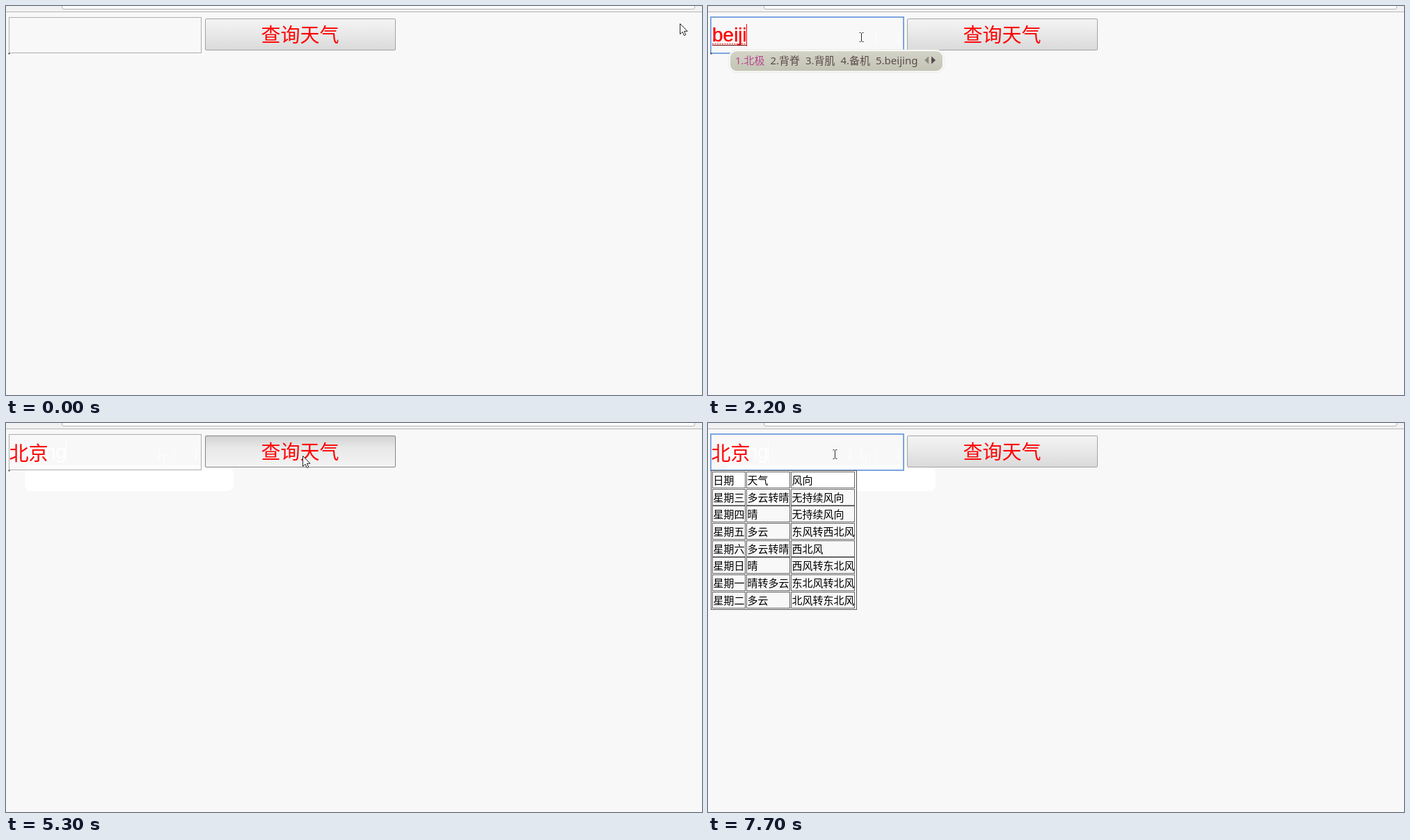
An HTML page that plays this animation: 1000x560 px, repeating every 8000 ms.

```html
<!DOCTYPE html>
<html lang="zh-CN">
<head>
<meta charset="utf-8">
<title>查询天气</title>
<style>
  html, body { margin: 0; width: 100%; height: 100%; overflow: hidden; background: #f8f8f8; }
  svg { display: block; width: 100vw; height: 100vh; }
  text { font-family: "Noto Sans CJK SC", "Noto Sans CJK", sans-serif; white-space: pre; }
  .big { font-size: 28px; font-weight: 350; fill: #f00; }
  .latin { font-family: "Liberation Sans", Arial, sans-serif; font-weight: 400; }
  #latin { stroke: #f00; stroke-width: .4; }
  .cell { font-size: 15px; fill: #000; stroke: none; }
  .option { font: 15px "Noto Sans", "Noto Sans CJK SC", "Noto Sans CJK", sans-serif; fill: #5b494b; }
  .option:first-child { fill: #b9458b; }
  .trace { fill: none; stroke: #fff; }
  #table rect, #field { shape-rendering: crispEdges; }
</style>
</head>
<body>
<svg id="stage" viewBox="0 0 1000 560">
  <defs>
    <linearGradient id="normal" x2="0" y2="1">
      <stop stop-color="#f4f4f4"/><stop offset=".38" stop-color="#ebebeb"/><stop offset="1" stop-color="#dadada"/>
    </linearGradient>
    <linearGradient id="hover" x2="0" y2="1">
      <stop stop-color="#f4f4f4"/><stop offset=".38" stop-color="#ececec"/><stop offset="1" stop-color="#dadada"/>
    </linearGradient>
    <linearGradient id="pressed" x2="0" y2="1">
      <stop stop-color="#d2d2d2"/><stop offset=".4" stop-color="#e9e9e9"/><stop offset="1" stop-color="#f3f3f3"/>
    </linearGradient>
    <linearGradient id="bar" x2="0" y2="1">
      <stop stop-color="#d3d4c8"/><stop offset="1" stop-color="#c3c4b4"/>
    </linearGradient>
    <path id="beam" d="M-2.5 -6.5H-.5M1.5 -6.5H3.5M.5 -6V6M-2.5 6.5H-.5M1.5 6.5H3.5"/>
  </defs>

  <rect width="1000" height="560" fill="#f8f8f8"/>
  <rect width="1000" height="8" fill="#f1f1f1"/>
  <path d="M80.5 -1V2Q80.5 4.5 83 4.5H987Q989.5 4.5 989.5 2V-1" fill="#fff" stroke="#b4b4b4"/>
  <path d="M0 8.5H1000" stroke="#b6b6b6"/>

  <g id="residue">
    <path d="M27 61H281V68H27Z" fill="#fff" opacity=".7"/>
    <path d="M27 68H281V64H317Q327 64 327 74V88Q327 98 317 98H37Q27 98 27 88Z" fill="#fff"/>
    <text class="big latin" x="55.8" y="51" style="fill:#fff">ng</text>
    <path class="trace" d="M86.5 27V58"/>
  </g>
  <g id="traces"></g>

  <rect id="field" fill="none"/>
  <rect id="dot" x="3.5" y="67.5" width="2" height="2" fill="#444"/>
  <rect id="button" x="286.5" y="18.5" width="273" height="45" rx="1.5"/>
  <text class="big" x="366.5" y="51.7">查询天气</text>

  <text id="latin" class="big latin" x="6" y="51"></text>
  <g id="underline" fill="none">
    <path id="squiggle" stroke="#f00" stroke-dasharray="2 1.5"/>
    <path id="rule" stroke="#6b0000"/>
  </g>
  <text id="city" class="big" x="4.4" y="54">北京</text>
  <path id="caret" stroke="#f00"/>

  <g id="popup">
    <rect id="rim" x="30" y="63" height="32.5" rx="11" fill="#fff" stroke="#e6e6e2"/>
    <rect id="pill" x="32" y="65" height="28.5" rx="9" fill="url(#bar)"/>
    <g id="options"></g>
    <g id="arrows"><path d="M6 -5.5V5.5L0 0Z" fill="#8b8b82"/><path d="M10 -5.5V5.5L16 0Z" fill="#5b494b"/></g>
  </g>

  <g id="table" fill="none" stroke="#555"></g>
  <g id="cursor">
    <path id="arrow" d="M.5 .5V15.5L4 12.2L6.3 17.5L8.7 16.5L6.4 11.3H11Z" fill="#fff" stroke="#222"/>
    <g id="textCursor" fill="none"><use href="#beam" stroke="#fff" stroke-width="3"/><use href="#beam" stroke="#222"/></g>
  </g>
</svg>
<script>
const DURATION = 8000;
const $ = id => document.getElementById(id);
const show = (id, on) => $(id).setAttribute('visibility', on ? 'visible' : 'hidden');
const set = (el, attrs) => { for (const k in attrs) el.setAttribute(k, attrs[k]); };
function add(parent, tag, attrs, text) {
  const el = document.createElementNS('http://www.w3.org/2000/svg', tag);
  set(el, attrs);
  if (text) el.textContent = text;
  return parent.appendChild(el);
}
// Each entry starts with its time; the latest one reached is in force.
const latest = (list, t) => list.reduce((a, b) => b[0] <= t ? b : a);
const within = (t, ...spans) => spans.some(([a, b]) => t >= a && t < b);

const pointer = [
  [0, 968, 25], [100, 934, 28], [200, 830, 33], [300, 660, 38], [400, 440, 42],
  [500, 273, 45], [600, 241, 45], [700, 220, 45], [4600, 226, 53],
  [4800, 290, 56], [4900, 348, 53], [5000, 398, 49], [5100, 420, 48], [5200, 426, 47],
  [6300, 345, 46], [6400, 241, 45], [6500, 204, 45], [6600, 182, 45]
];
const typed = [[0, ''], [1800, 'be'], [1900, 'bei'], [2200, 'beiji'], [2400, 'beijin'], [3400, 'beijing'], [4000, '']];
const choices = [
  [0, ''], [1900, '北 被 背 杯 贝'], [2200, '北极 背脊 背肌 备机 beijing'],
  [2400, '被禁 北金 背筋 贝金 悲今'], [3500, '北京 背景 北境 背静 悲境'], [4000, '']
];
const borders = { normal: '#a3a3a3', hover: '#858585', pressed: '#858585' };
const advance = { b: 15.57, e: 15.57, i: 6.22, j: 6.22, n: 15.57, g: 15.57 };
const textWidth = s => [...s].reduce((w, c) => w + advance[c], 0);
const choiceWidth = s => 12.5 + (/[a-z]/.test(s) ? 45 : 15 * s.length);

const traces = [[600, 273, 45], [700, 241, 45], [4600, 220, 45], [4800, 226, 53], [6600, 204, 45]]
  .map(([time, x, y]) => ({ time, el: add($('traces'), 'use', { href: '#beam', class: 'trace', transform: `translate(${x} ${y})` }) }));

function buildTable() {
  const rows = `日期 天气 风向
星期三 多云转晴 无持续风向
星期四 晴 无持续风向
星期五 多云 东风转西北风
星期六 多云转晴 西北风
星期日 晴 西风转东北风
星期一 晴转多云 东北风转北风
星期二 多云 北风转东北风`.split('\n');
  const columns = [[6.5, 47], [55.5, 62], [119.5, 91]];
  add($('table'), 'rect', { x: 4.5, y: 68.5, width: 209, height: 200 });
  rows.forEach((row, r) => row.split(' ').forEach((label, c) => {
    const [x, width] = columns[c], y = Math.round(70 + r * 24.67) + .5;
    add($('table'), 'rect', { x, y, width, height: 23, stroke: '#666' });
    add($('table'), 'text', { x: x + 1, y: y + 17.2, class: 'cell' }, label);
  }));
}

let shownChoices = '';
function drawPopup(list) {
  show('popup', list);
  if (list === shownChoices) return;
  shownChoices = list;
  $('options').replaceChildren();
  if (!list) return;
  let x = 39;
  list.split(' ').forEach((word, i) => {
    add($('options'), 'text', { x, y: 84, class: 'option' }, `${i + 1}.${word}`);
    x += choiceWidth(word) + 8;
  });
  const end = x - 8;
  set($('arrows'), { transform: `translate(${end + 12.5} 78)` });
  set($('pill'), { width: end + 38.5 - 32 });
  set($('rim'), { width: end + 40.5 - 30 });
}

function drawText(t) {
  const text = latest(typed, t)[1], end = Math.round(6 + textWidth(text)) - .5;
  $('latin').textContent = text;
  show('underline', text);
  set($('squiggle'), { d: `M6 54.5H${end}` });
  set($('rule'), { d: `M6 56.5H${end}` });
  show('city', t >= 4000);
  show('residue', t >= 4000);
  show('caret', within(t, [800, 1200], [1800, 2900], [3400, 4500], [7200, 7700]));
  set($('caret'), { d: t >= 4000 ? 'M60.5 27V59' : text ? `M${end} 26V58` : 'M5.5 26V59' });
}

function draw(t) {
  const focused = within(t, [800, 5300], [7200, DURATION]);
  set($('field'), focused
    ? { x: 4, y: 16, width: 277, height: 52, stroke: '#7ba6df', 'stroke-width': 2 }
    : { x: 4.5, y: 16.5, width: 276, height: 51, stroke: '#adadad', 'stroke-width': 1 });

  const [, x, y] = latest(pointer, t);
  const overField = x < 281, overButton = x > 286 && x < 560;
  const state = within(t, [5300, 5400]) ? 'pressed' : overButton ? 'hover' : 'normal';
  set($('button'), { fill: `url(#${state})`, stroke: borders[state] });

  drawText(t);
  drawPopup(latest(choices, t)[1]);
  show('table', t >= 5500);
  show('dot', t < 5500);
  traces.forEach(({ time, el }) => set(el, { visibility: t >= time ? 'visible' : 'hidden' }));
  set($('cursor'), { transform: `translate(${x} ${y})` });
  show('arrow', !overField);
  show('textCursor', overField);
}

buildTable();
const start = performance.now();
function tick() {
  draw((performance.now() - start) % DURATION);
  requestAnimationFrame(tick);
}
tick();
</script>
</body>
</html>
```
